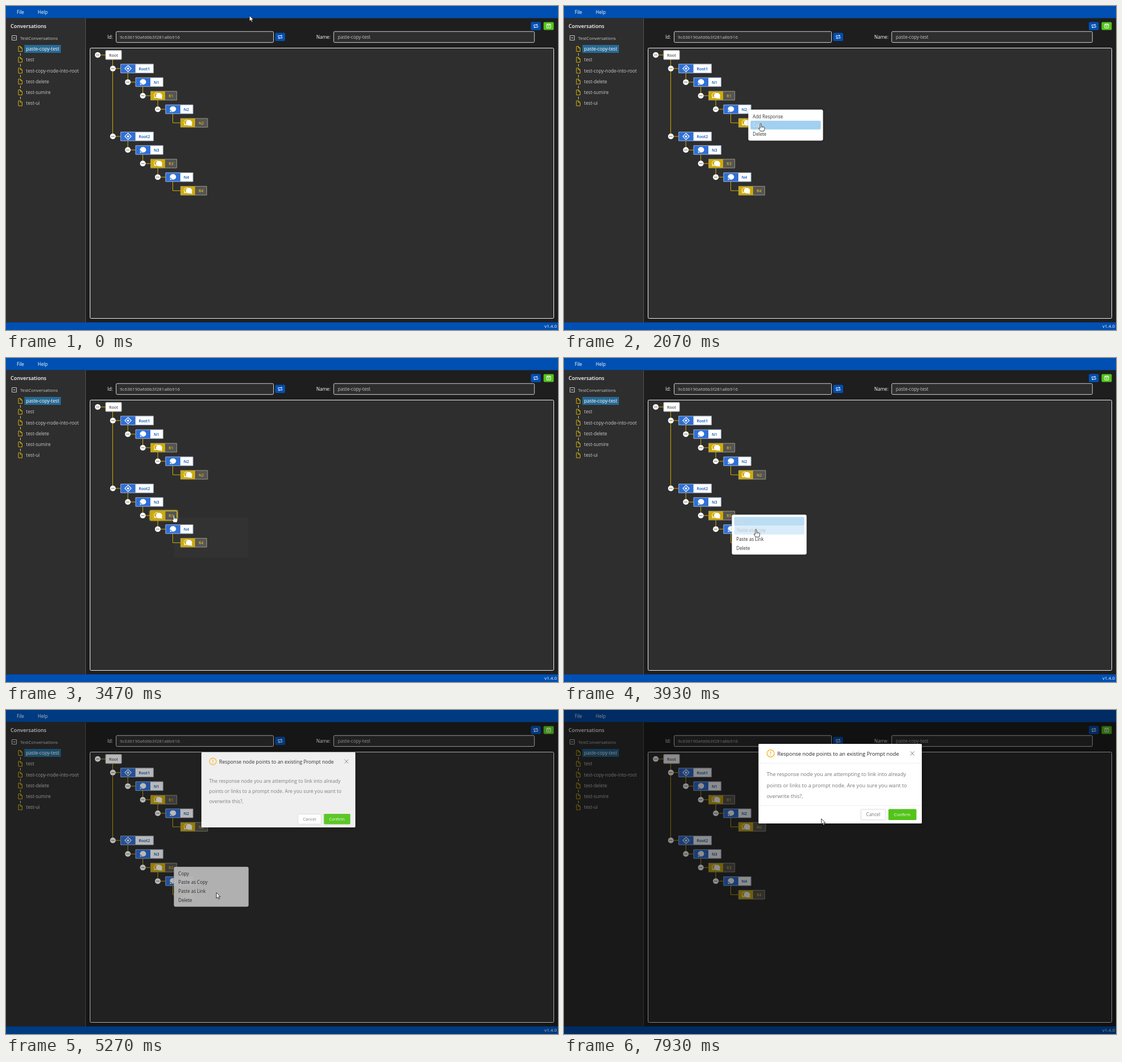
Recreate the animation shown at these times as an HTML page with a canvas. Size 975 px wide and 574 px high, loop 8 s.

```html
<!DOCTYPE html>
<html lang="en">
<head>
<meta charset="utf-8">
<title>Conversation editor</title>
<style>
html, body { margin: 0; width: 100%; height: 100%; overflow: hidden; background: #1e1e1e; }
canvas { display: block; }
</style>
</head>
<body>
<canvas id="stage" width="975" height="574"></canvas>
<script>
const c = document.getElementById('stage').getContext('2d');
const BLUE = '#0050b3', GOLD = '#d4b106', PANEL = '#2e2e2e', GREEN = '#52c41a';
const LOOP = 8000, STEP = 200 / 3;

const clamp = v => Math.max(0, Math.min(1, v));
const smooth = u => u * u * (3 - 2 * u);
// Rises from 0 to 1 after a, falls back after b (times in steps).
const pulse = (k, a, b, rise = 2, fall = 2) => clamp((k - a) / rise) * (1 - clamp((k - b) / fall));

function text(s, x, y, size, color, weight = 400) {
  c.font = `${weight} ${size}px "Open Sans", "Noto Sans", sans-serif`;
  c.fillStyle = color;
  c.fillText(s, x, y);
}
function box(x, y, w, h, fill, stroke, r = 0) {
  c.beginPath();
  c.roundRect(x, y, w, h, r);
  if (fill) { c.fillStyle = fill; c.fill(); }
  if (stroke) { c.strokeStyle = stroke; c.lineWidth = 1; c.stroke(); }
}
function line(color, width, ...p) {
  c.beginPath();
  for (let i = 0; i < p.length; i += 2) c.lineTo(p[i], p[i + 1]);
  c.strokeStyle = color;
  c.lineWidth = width;
  c.stroke();
}
function disc(x, y, r, fill) {
  c.beginPath();
  c.arc(x, y, r, 0, 7);
  c.fillStyle = fill;
  c.fill();
}
function at(x, y, s, draw) {
  c.save();
  c.translate(x, y);
  c.scale(s, s);
  draw();
  c.restore();
}

function syncButton(x, y) {
  box(x, y, 17.5, 14.5, BLUE, null, 2);
  at(x + 8.75, y + 7.25, 1, () => {
    line('#fff', 1, -3.5, 0, -3.5, -2, 3, -2);
    line('#fff', 1, 3.5, 0, 3.5, 2, -3, 2);
    line('#fff', 1, 1.5, -3.6, 3.3, -2, 1.5, -.6);
    line('#fff', 1, -1.5, .6, -3.3, 2, -1.5, 3.6);
  });
}
function saveButton(x, y) {
  box(x, y, 18, 14, GREEN, null, 2);
  box(x + 5.5, y + 3.5, 7, 7, null, '#fff', .5);
  line('#fff', 1, x + 7, y + 3.5, x + 7, y + 5.5, x + 11, y + 5.5, x + 11, y + 3.5);
  disc(x + 9, y + 8, 1, '#fff');
}

function sidebar() {
  box(0, 21.5, 140.5, 539, PANEL);
  line('#555', 1, 140.5, 21.5, 140.5, 560.5);
  text('Conversations', 8, 39, 9.2, '#fff', 600);
  box(10.5, 52.5, 8, 8, null, '#c8c8c8');
  line('#d8d8d8', 1, 12.5, 56.5, 16.5, 56.5);
  text('TestConversations', 25, 59.7, 7.8, '#c8c8c8');
  const items = ['paste-copy-test', 'test', 'test-copy-node-into-root', 'test-delete', 'test-sumire', 'test-ui'];
  items.forEach((s, i) => {
    const y = 76 + i * 19.27;
    if (!i) box(32.5, 69, 64.5, 14, '#286a94');
    line(GOLD, 1, 25.5, y - 4.5, 22, y - 4.5, 22, y + 4.5, 28.5, y + 4.5, 28.5, y - 1.5, 25.5, y - 4.5);
    line(GOLD, 1, 25.5, y - 4.5, 25.5, y - 1.5, 28.5, y - 1.5);
    if (i < 5) line('#c9c4a8', 1, 25.5, y + 7.5, 25.5, y + 12);
    text(s, 35.5, y + 3, 8.2, i ? '#c8c8c8' : '#fff');
  });
}

// label, depth, row, kind, label width, leaf, glow start, glow end
const nodes = [
  ['Root1', 1, 1, 'root', 32], ['N1', 2, 2, 'prompt', 22.5], ['R1', 3, 3, 'reply', 20.5],
  ['N2', 4, 4, 'prompt', 22.5, 0, 11, 20], ['N2', 5, 5, 'reply', 22, 1, 36, 39],
  ['Root2', 1, 6, 'root', 32], ['N3', 2, 7, 'prompt', 22.5], ['R3', 3, 8, 'reply', 20.5, 0, 47.5, 56],
  ['N4', 4, 9, 'prompt', 22.5], ['R4', 5, 10, 'reply', 20.5, 1]
];

function toggle(x, y) {
  disc(x, y, 5, '#fff');
  line('#666', 1, x - 3, y, x + 3, y);
}
function bubble(x, y, side) {
  c.beginPath();
  c.ellipse(x, y, 5.5, 4.9, 0, 0, 7);
  c.moveTo(x + side * 5, y + 1);
  c.lineTo(x + side * 5.3, y + 5.5);
  c.lineTo(x + side, y + 4.6);
  c.fillStyle = '#fff';
  c.fill();
}
function icon(kind, x, y) {
  if (kind === 'root') {
    const diamond = r => [x, y - r, x + r, y, x, y + r, x - r, y, x, y - r, x + r, y];
    line('#fff', 1.2, ...diamond(5.6));
    line('#fff', 1.8, ...diamond(1.1));
  } else if (kind === 'prompt') {
    bubble(x, y - .4, -1);
  } else {
    c.beginPath();
    c.ellipse(x - 2.2, y - .8, 4.7, 4.2, 0, 0, 7);
    c.moveTo(x - 6, y + 1);
    c.lineTo(x - 6.5, y + 4);
    c.lineTo(x - 3, y + 3.4);
    c.strokeStyle = '#fff';
    c.lineWidth = 1;
    c.stroke();
    bubble(x + 1.9, y, 1);
  }
}
function tree(k) {
  line(GOLD, 1, 162, 86.8, 176, 86.8);
  line(GOLD, 1, 188.4, 95, 188.4, 231);
  toggle(162, 86.8);
  box(176, 78.8, 28, 16, '#fff', '#bbb', 1);
  text('Root', 182, 89.6, 7.2, '#222');
  for (const [label, depth, row, kind, w, leaf, from, to] of nodes) {
    const y = 86.8 + row * 24.04, x = 175.9 + depth * 26.45, jx = x - 13.6;
    const reply = kind === 'reply', full = 26.2 + w;
    if (depth > 1) line(GOLD, 1, jx, y - 16, jx, y);
    line(GOLD, 1, jx, y, x, y);
    if (!leaf) toggle(jx, y);
    const glow = from ? pulse(k, from, to) : 0;
    if (glow) {
      c.save();
      c.globalAlpha = glow;
      c.shadowColor = reply ? '#ffd500' : '#4096ff';
      c.shadowBlur = 3;
      box(x - 1, y - 9, full + 2, 18, reply ? '#f0c800' : '#4d94f5', null, 2);
      c.restore();
    }
    box(x, y - 8, 26.2, 16, reply ? '#cfab04' : '#2f6fd6');
    box(x + 26.2, y - 8, w, 16, reply ? '#555' : '#fff');
    box(x + .3, y - 7.8, full - .6, 15.6, null, reply ? '#9a9680' : '#a4b4d0');
    icon(kind, x + 13.2, y);
    text(label, x + 32.1, y + 2.8, 7, reply ? '#ffd000' : BLUE, reply ? 400 : 600);
  }
}

function page(k) {
  box(0, 0, 975, 574, '#1e1e1e');
  box(0, 0, 975, 21.5, BLUE);
  text('File', 19, 14, 8.2, '#fff');
  text('Help', 56, 14, 8.2, '#fff');
  sidebar();
  text('Id:', 179, 58, 8.2, '#fff', 500);
  box(194.5, 45.2, 278, 19.4, PANEL, k > 3 && k < 6 ? '#3c8ce0' : '#d4d4d4', 2);
  text('9c636190afd6b3f281a8b916', 201, 58, 8, '#c4c4c4');
  syncButton(475.5, 47.5);
  text('Name:', 548, 58, 8.2, '#fff', 500);
  box(578.8, 45.2, 354.5, 19.4, PANEL, '#d4d4d4', 2);
  text('paste-copy-test', 586, 58, 8.1, '#c4c4c4');
  syncButton(927, 28.3);
  saveButton(949.5, 28.5);
  box(148.5, 74.5, 819, 479, PANEL, '#f0f0f0', 2);
  tree(k);
  box(0, 560.5, 975, 13.5, BLUE);
  text('v1.4.0', 951, 570.3, 8, '#fff');
}

// Each item: label, highlight start, highlight end.
const menus = [
  { x: 325.5, y: 183.5, open: 16.9, close: 34, items: [['Add Response', 20.5, 28], ['Copy', 28.5, 36], ['Delete']] },
  { x: 296.5, y: 277.5, open: 51.9, close: 78.8,
    items: [['Copy', 55, 58], ['Paste as Copy', 58, 60.6], ['Paste as Link', 60.6, 77], ['Delete']] }
];
function menu(m, k) {
  const shown = pulse(k, m.open, m.close, 4, 4);
  if (!shown) return;
  c.save();
  c.globalAlpha = shown;
  c.translate(m.x, m.y + 5.5 * (1 - shown));
  c.shadowColor = 'rgba(0,0,0,.3)';
  c.shadowBlur = 4;
  box(0, 0, 132, 8 + m.items.length * 15.7, '#fff', null, 3);
  c.shadowBlur = 0;
  m.items.forEach(([label, from, to], i) => {
    const y = 4 + i * 15.7, lit = from ? pulse(k, from, to, 3.6) : 0;
    text(label, 7.8, y + 11, 8.05, '#333');
    if (lit) {
      c.globalAlpha = shown * lit;
      box(4, y, 124, 15.6, '#78bbe9', null, 2);
      c.globalAlpha = shown;
      text(label, 7.8, y + 11, 8.05, '#fff');
    }
  });
  c.restore();
}

function modal(k) {
  const u = clamp((k - 77.5) / 4.5);
  if (!u) return;
  box(0, 0, 975, 574, `rgba(0,0,0,${.45 * clamp((k - 77.4) / 2.6)})`);
  const e = 1 - (1 - u) ** 6.5;
  c.save();
  c.globalAlpha = e;
  // Grows out of the clicked menu item.
  at(372, 323, .2 + .8 * e, () => {
    c.translate(-372, -323);
    c.shadowColor = 'rgba(0,0,0,.3)';
    c.shadowBlur = 8;
    box(343.5, 60, 288.5, 141, '#fff', null, 1.5);
    c.shadowBlur = 0;
    c.beginPath();
    c.arc(365, 77, 6.4, 0, 7);
    c.strokeStyle = '#faad14';
    c.lineWidth = 1.2;
    c.stroke();
    line('#faad14', 1.2, 365, 73.3, 365, 78.2);
    disc(365, 80.2, .8, '#faad14');
    text('Response node points to an existing Prompt node', 376.8, 81, 9.25, '#222', 500);
    line('#777', 1, 611.8, 73.3, 618.8, 80.7);
    line('#777', 1, 618.8, 73.3, 611.8, 80.7);
    line('#eee', 1, 343.5, 94.3, 632, 94.3);
    ['The response node you are attempting to link into already',
     'points or links to a prompt node. Are you sure you want to',
     'overwrite this?,'].forEach((s, i) => text(s, 358, 117.3 + i * 19.3, 9.15, '#777'));
    line('#eee', 1, 343.5, 169.5, 632, 169.5);
    box(524.5, 176, 43.5, 18.8, '#fff', '#d9d9d9', 1.5);
    text('Cancel', 533.8, 188.2, 8.05, '#777');
    box(573, 175.6, 49.5, 19.5, GREEN, null, 1.5);
    text('Confirm', 582.8, 188.2, 7.7, '#fff', 500);
  });
  c.restore();
}

// step, x, y of the pointer tip
const path = [
  [0, 430, 17], [13, 324, 184], [14, 325.5, 184], [20, 326, 185], [33, 349, 210], [34, 349, 210],
  [42, 327, 243], [50, 296.5, 278], [53, 296.5, 278], [64, 371.5, 323.5], [85, 371.5, 323.5],
  [95, 452.3, 193], [103, 452.3, 193], [105, 453.4, 192.6], [118, 453.4, 192.6], [119, 454.6, 192.6]
];
function pointer(k) {
  let i = path.findIndex(p => p[0] > k);
  if (i < 0) i = path.length - 1;
  const [a, ax, ay] = path[i - 1], [b, bx, by] = path[i];
  const e = smooth(clamp((k - a) / (b - a)));
  const hand = k >= 12 && k < 39 || k >= 49 && k < 75;
  const shape = hand
    ? 'M-1.2.6Q0-.7 1.2.6V5Q2.6 4.3 3.3 5.5Q4.6 4.9 5.2 6.2Q6.6 5.8 6.6 7.4V10L5.5 13.3H-.6L-3.5 8.8Q-3.6 7-1.2 8.4Z'
    : 'M0 0V10L2.3 7.9L4 11.4L5.6 10.7L4 7.3H7.2Z';
  at(ax + (bx - ax) * e, ay + (by - ay) * e, 1, () => {
    const p = new Path2D(shape);
    c.fillStyle = '#fff';
    c.fill(p);
    c.strokeStyle = '#111';
    c.lineWidth = .8;
    c.stroke(p);
    if (hand) {
      line('#111', .6, 1.2, 5, 1.2, 7.5);
      line('#111', .6, 3.3, 5.5, 3.3, 7.8);
    }
  });
}

const start = performance.now();
function frame() {
  const t = (performance.now() - start) % LOOP;
  const k = Math.floor((t + 4) / STEP) % 120;
  page(k);
  menus.forEach(m => menu(m, k));
  modal(k);
  pointer(k);
  requestAnimationFrame(frame);
}
frame();
</script>
</body>
</html>
```
